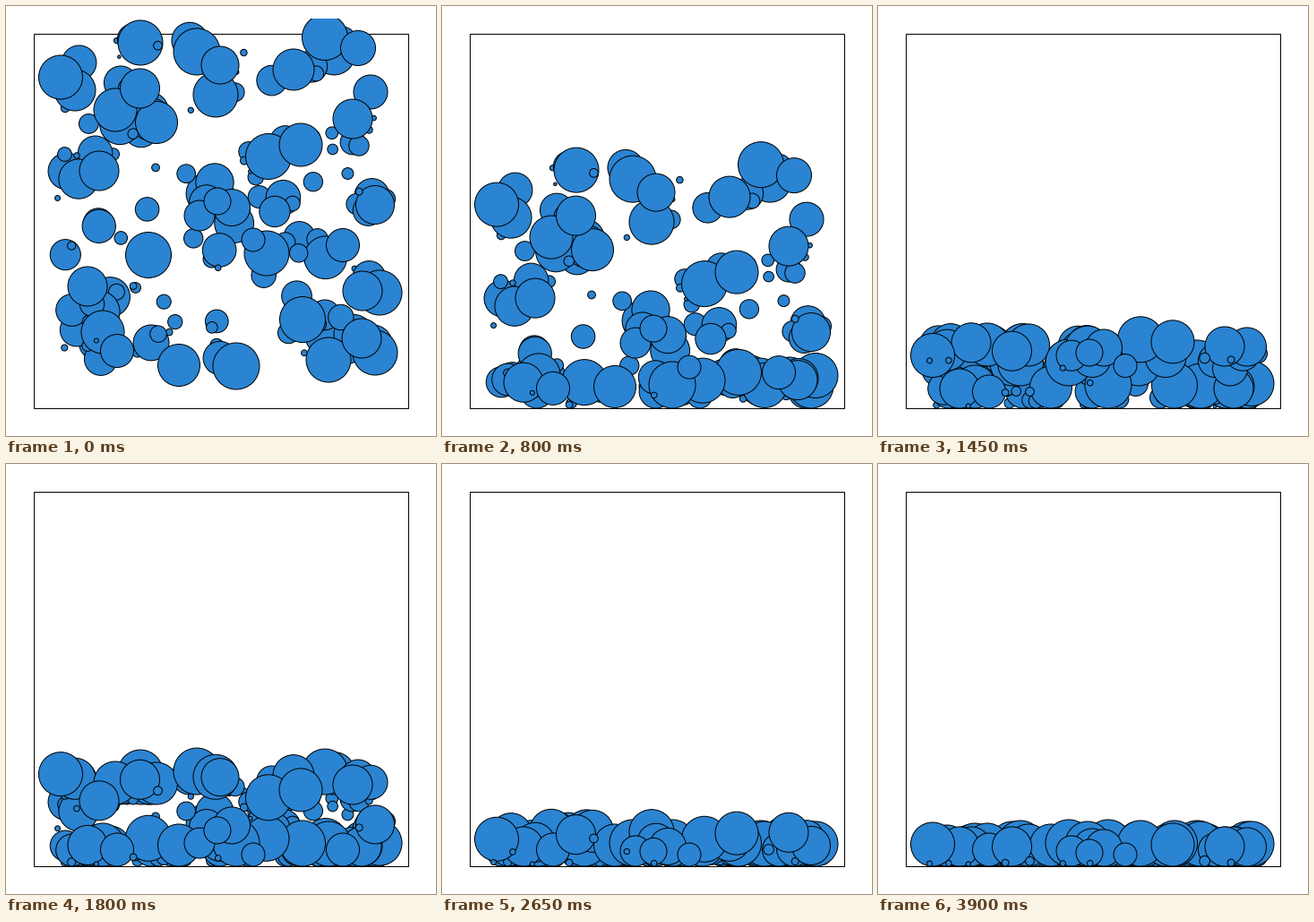
These frames come from a looping animation (480 by 480 pixels, 4.55 s). A matplotlib script:

```python
import numpy as np
import matplotlib.pyplot as plt
from matplotlib.animation import FuncAnimation
from matplotlib.collections import EllipseCollection
from matplotlib.patches import Rectangle

SIZE, DPI = 480, 100
LEFT, TOP, SIDE = 31, 31, 418
FLOOR = TOP + SIDE
CLIP = 14                 # margin above and below the drawing area
GRAVITY = SIDE / 400      # pixels per step squared
STEPS, FRAMES = 78, 91    # the last pose is held
PX = 72 / DPI
BLUE = "#2a84d2"

# Leading balls, back to front: x, y, radius
BALLS = [
    (356, 35, 25.5), (150, 41, 25), (77, 94, 23), (412, 387, 25),
    (417, 320, 25), (108, 364, 24), (360, 395, 25), (331, 350, 25.5),
    (291, 276, 25), (257, 402, 26), (122, 116, 24), (104, 184, 22),
    (91, 313, 22), (159, 278, 25.5), (168, 130, 23.5), (124, 385, 18.5),
    (193, 401, 23.5), (398, 318, 22), (397, 371, 22), (376, 267, 18.5),
    (321, 71, 23), (213, 51, 26), (234, 99, 25), (239, 66, 21),
    (393, 47, 19.5), (407, 96, 19), (293, 168, 25.5), (329, 155, 24),
    (412, 222, 21.5), (387, 126, 22), (61, 79.5, 24.5), (149.5, 92, 22),
    (252, 225, 20.5), (216, 234, 17), (236, 218, 15), (276, 261, 13),
]

# Centres of open patches that stay free at the start
GAPS = np.array([
    (50, 130), (283, 118), (290, 45), (153, 340), (275, 335),
    (60, 405), (145, 425), (290, 420), (430, 50), (425, 262),
])
GAP_R = 17

rng = np.random.default_rng(12)


def scatter(count, r_min, r_max):
    """Random balls inside the walls that avoid the open patches."""
    out = []
    while len(out) < count:
        x, y = rng.uniform(52, 430), rng.uniform(36, 406)
        r = rng.uniform(r_min, r_max)
        clear = np.hypot(GAPS[:, 0] - x, GAPS[:, 1] - y) > GAP_R + r
        if clear.all() and LEFT <= x - r and x + r <= 442:
            out.append((x, y, r))
    return out


def bounce(drop):
    """Heights above the floor per step; each hit halves the speed."""
    h = np.array(drop, float)
    v = np.zeros_like(h)
    path = [h.copy()]
    for _ in range(STEPS):
        v -= 1
        h += v
        hit = h < 0
        h[hit] = 0
        v[hit] *= -0.5
        path.append(h.copy())
    return np.array(path)


balls = np.array(scatter(125, 1.5, 24) + BALLS + scatter(9, 1.5, 7))
xs, ys, rs = balls.T
rest = FLOOR - rs
heights = bounce((rest - ys) / GRAVITY) * GRAVITY

fig = plt.figure(figsize=(SIZE / DPI, SIZE / DPI), dpi=DPI, facecolor="white")
ax = fig.add_axes([0, CLIP / SIZE, 1, 1 - 2 * CLIP / SIZE])
ax.set_xlim(0, SIZE)
ax.set_ylim(SIZE - CLIP, CLIP)
ax.axis("off")
ax.add_patch(Rectangle((LEFT - 0.5, TOP - 0.5), SIDE, SIDE, fill=False,
                       edgecolor="black", linewidth=PX, zorder=1))
discs = EllipseCollection(2 * rs, 2 * rs, np.zeros_like(rs), units="x",
                          offsets=np.column_stack([xs, ys]),
                          offset_transform=ax.transData,
                          facecolors=BLUE, edgecolors="black",
                          linewidths=PX, zorder=2)
ax.add_collection(discs, autolim=False)


def draw(i):
    discs.set_offsets(np.column_stack([xs, rest - heights[min(i, STEPS)]]))
    return (discs,)


anim = FuncAnimation(fig, draw, frames=FRAMES, interval=50,
                     repeat=True, repeat_delay=0, blit=False)
plt.show()
```
